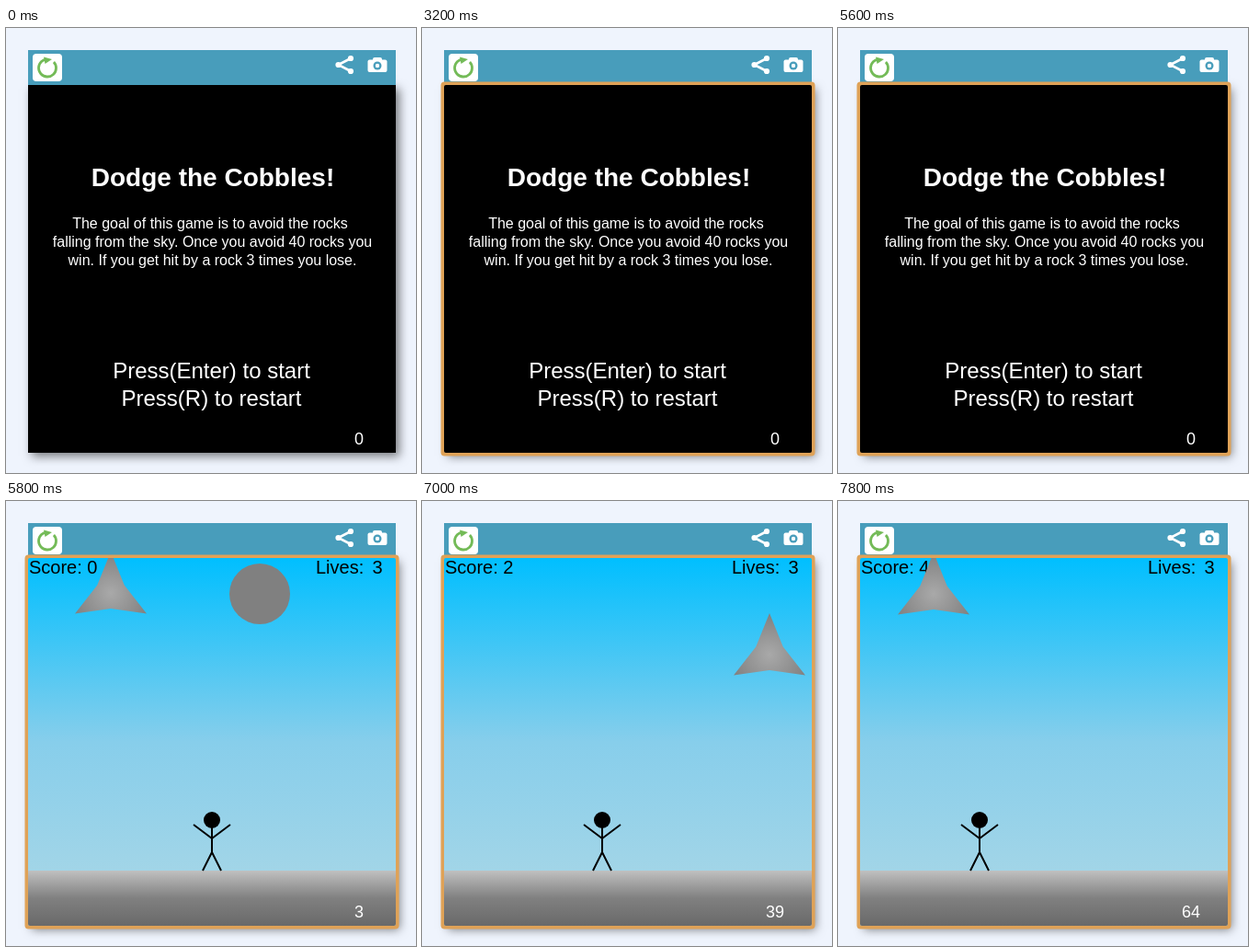
Write an HTML page with a canvas that moves like this. It is 446x484 px and loops after 8000 ms.

```html
<!DOCTYPE html>
<html lang="en">
<head>
<meta charset="utf-8">
<title>Falling rocks</title>
<style>
  html, body { margin: 0; width: 100%; height: 100%; overflow: hidden; background: #eff4fd; }
  canvas { display: block; }
</style>
</head>
<body>
<canvas id="stage" width="446" height="484"></canvas>
<script>
const ctx = document.getElementById('stage').getContext('2d');
const LOOP = 8000, FOCUS_TIME = 600;
const BLUE = '#489dbb';

// Each drop: first tick, last tick, x, starting y, speed per tick.
const starDrops = [[0, 30, 90, 2, 12], [30, 61, 354, -3, 12], [61, 99, 80, 3, 12]];
const ballDrops = [[0, 28, 252, 0, 13], [40, 63, 180, -33, 17]];
const scoreTicks = [28, 30, 61, 63];
const walk = [[0, 200], [4, 200], [15, 151], [39, 172], [64, 130], [99, 130]];

function text(str, x, y, size, color = '#fff', align = 'center', weight = '') {
  ctx.font = `${weight} ${size}px "Liberation Sans", Arial, sans-serif`;
  ctx.fillStyle = color;
  ctx.textAlign = align;
  ctx.fillText(str, x, y);
}

function box(x, y, w, h, color, radius = 0) {
  ctx.fillStyle = color;
  ctx.beginPath();
  ctx.roundRect(x, y, w, h, radius);
  ctx.fill();
}

function disc(x, y, r, color) {
  ctx.fillStyle = color;
  ctx.beginPath();
  ctx.arc(x, y, r, 0, Math.PI * 2);
  ctx.fill();
}

function line(color, width, ...points) {
  ctx.strokeStyle = color;
  ctx.lineWidth = width;
  ctx.beginPath();
  points.forEach(([x, y]) => ctx.lineTo(x, y));
  ctx.stroke();
}

function shade(gradient, colors) {
  colors.forEach((c, i) => gradient.addColorStop(i / (colors.length - 1), c));
  return gradient;
}

const vertical = (top, bottom, ...colors) =>
  shade(ctx.createLinearGradient(0, top, 0, bottom), colors);

function drawHeader() {
  box(24, 24, 400, 38, BLUE);

  // Reset button
  box(29, 28, 32, 30, '#fff', 4);
  ctx.strokeStyle = '#74bb58';
  ctx.lineWidth = 2.8;
  ctx.beginPath();
  ctx.arc(45, 43.5, 9.5, -0.75, Math.PI * 1.45);
  ctx.stroke();
  ctx.fillStyle = '#74bb58';
  ctx.beginPath();
  ctx.moveTo(41, 31.5);
  ctx.lineTo(50, 34);
  ctx.lineTo(42.5, 39);
  ctx.fill();

  // Share
  line('#fff', 2.6, [375, 33], [361.5, 40], [375, 47]);
  for (const [x, y] of [[375, 33], [361.5, 40], [375, 47]]) disc(x, y, 3.1, '#fff');

  // Camera
  box(393.5, 34.5, 21, 13.5, '#fff', 2);
  box(399, 32, 10, 5, '#fff', 2);
  disc(404, 41, 4.5, BLUE);
  disc(404, 41, 2.2, '#fff');
}

function drawTitle() {
  box(0, 0, 400, 400, '#000');
  text('Dodge the Cobbles!', 201, 110, 28, '#fff', 'center', 'bold');
  text('The goal of this game is to avoid the rocks', 198, 156, 16);
  text('falling from the sky. Once you avoid 40 rocks you', 200.5, 176, 16);
  text('win. If you get hit by a rock 3 times you lose.', 200.5, 196, 16);
  text('Press(Enter) to start', 199.5, 319, 24);
  text('Press(R) to restart', 199.5, 349, 24);
}

function drawStar(x, y) {
  ctx.fillStyle = shade(ctx.createRadialGradient(x, y, 0, x, y, 45), ['#a9a9a9', '#808080']);
  ctx.beginPath();
  for (let i = 0; i < 6; i++) {
    const r = i % 2 ? 17 : 45, angle = i * Math.PI / 3 - Math.PI / 2;
    ctx.lineTo(x + r * Math.cos(angle), y + r * Math.sin(angle));
  }
  ctx.fill();
}

function drawPlayer(x) {
  line('#000', 2, [x, 290], [x, 320]);
  line('#000', 2, [x - 20, 290], [x, 305], [x + 20, 290]);
  line('#000', 2, [x - 10, 340], [x, 320], [x + 10, 340]);
  disc(x, 285, 9, '#000');
}

function playerX(tick) {
  const i = walk.findIndex(([end]) => tick < end);
  const [t0, x0] = walk[i - 1], [t1, x1] = walk[i];
  const x = x0 + (x1 - x0) * (tick - t0) / (t1 - t0);
  return 200 + 7 * Math.round((x - 200) / 7);
}

function drawDrops(drops, tick, draw) {
  for (const [first, last, x, y, speed] of drops)
    if (tick >= first && tick < last) draw(x, y + speed * (tick - first));
}

function drawGame(tick) {
  box(0, 0, 400, 400, vertical(0, 400, '#00bfff', '#87ceeb', '#add8e6'));
  box(0, 340, 400, 60, vertical(340, 400, '#c0c0c0', '#808080', '#696969'));
  const score = scoreTicks.filter(t => t <= tick).length;
  text(`Score: ${score}`, 1, 17, 20, '#000', 'left');
  text('Lives:', 313, 17, 20, '#000', 'left');
  text('3', 380, 17, 20, '#000');
  drawPlayer(playerX(tick));
  drawDrops(ballDrops, tick, (x, y) => disc(x, y, 33, '#808080'));
  drawDrops(starDrops, tick, drawStar);
}

function render(time) {
  const tick = Math.floor(15.3 + (time - 6200) * 0.0306);
  box(0, 0, 446, 484, '#eff4fd');

  ctx.save();
  ctx.shadowColor = 'rgba(0,0,0,.5)';
  ctx.shadowBlur = 10;
  ctx.shadowOffsetX = ctx.shadowOffsetY = 4;
  box(24, 62, 400, 400, '#000');
  ctx.restore();

  drawHeader();
  if (time >= FOCUS_TIME) box(20.5, 58.5, 407, 407, '#dfa257', 4);

  ctx.save();
  ctx.translate(24, 62);
  ctx.beginPath();
  ctx.roundRect(0, 0, 400, 400, time >= FOCUS_TIME ? 2 : 0);
  ctx.clip();
  if (tick < 0) drawTitle();
  else drawGame(tick);
  text(Math.max(0, tick), 360, 391, 18);
  ctx.restore();
}

function loop() {
  render(performance.now() % LOOP);
  requestAnimationFrame(loop);
}
loop();
</script>
</body>
</html>
```
